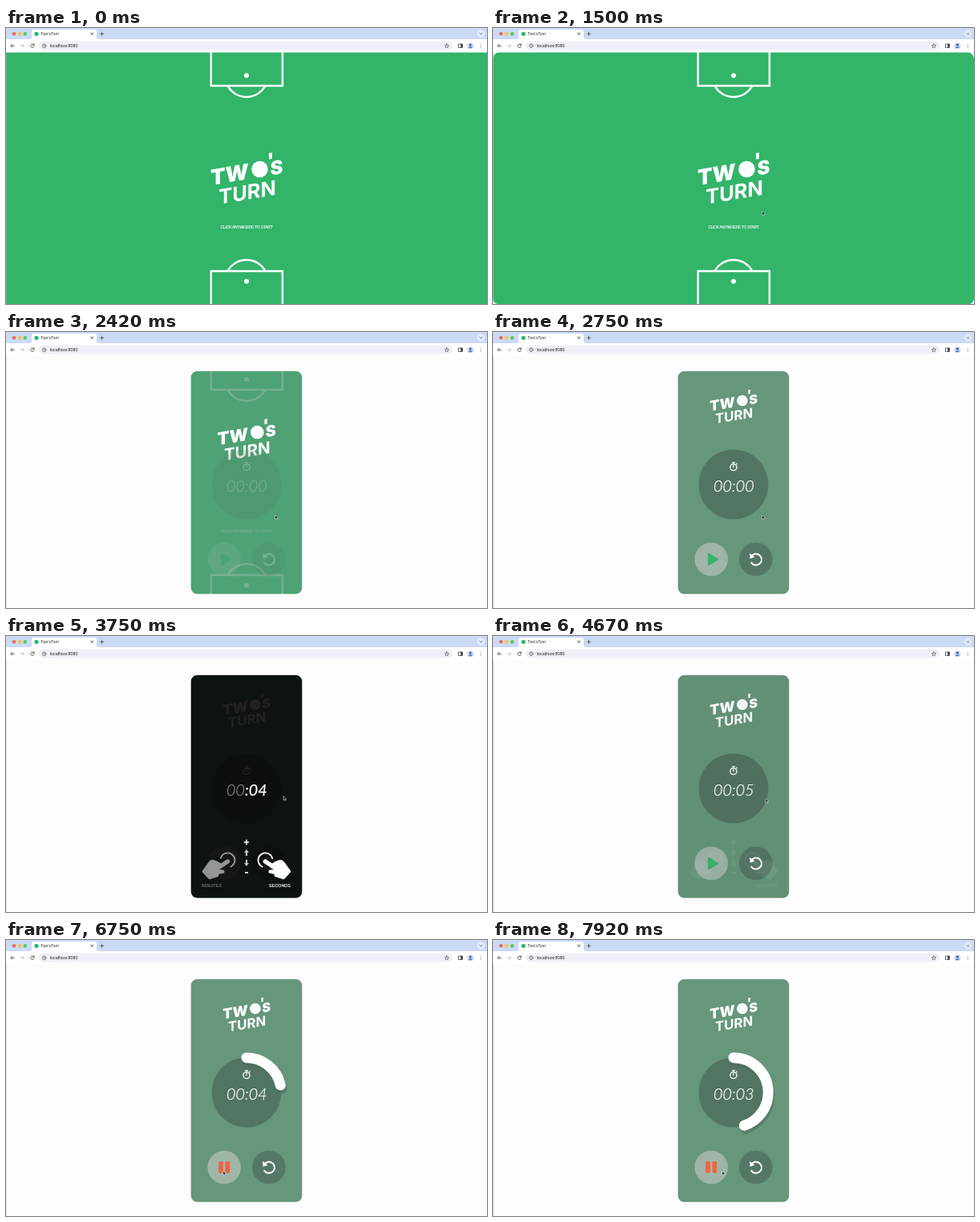
Recreate the animation shown at these times as an HTML page. Size 600x344 px, loop 8 s.

```html
<!DOCTYPE html>
<html lang="en">
<head>
<meta charset="utf-8">
<title>Two'sTurn</title>
<style>
html, body { margin: 0; width: 100%; height: 100%; overflow: hidden; background: #fdfdfd; }
svg { display: block; width: 100vw; height: 100vh; }
text { font-family: "Liberation Sans", Arial, sans-serif; }
.line { fill: none; stroke: #fff; stroke-width: 2.5; }
.ui { fill: none; stroke: #3c4043; stroke-width: .8; stroke-linecap: round; stroke-linejoin: round; }
.logo text { font-family: Inter, "Open Sans", sans-serif; font-weight: 900; fill: #fff; }
#clock { font: italic 300 19.8px Lato, "Open Sans", sans-serif; fill: #fff; stroke: #fff; stroke-width: .25; }
.icon { fill: none; stroke: #fff; stroke-linecap: round; }
.arc { fill: none; stroke-width: 13; stroke-linecap: round; }
</style>
</head>
<body>
<svg viewBox="0 0 600 344" preserveAspectRatio="none">
  <defs>
    <mask id="cardMask" maskUnits="userSpaceOnUse" x="0" y="0" width="600" height="344"><rect id="card" fill="#fff"/></mask>
    <g id="halfPitch">
      <path class="line" d="M255.8 25V72.1H344.9V25M276.9 72.9A27 27 0 0 0 323.1 72.9"/>
      <circle cx="300" cy="59.3" r="3" fill="#fff"/>
    </g>
    <g id="hand">
      <path d="M323.5 281L337 290" stroke="#fff" stroke-width="5.4" stroke-linecap="round"/>
      <path d="M331 284L337 280.5Q344 277 347 281.5L355 292.5Q355.5 294 354 295.5L347.5 302.5Q346 304 343.5 302.5L335.5 300Q334 299 335 297L328 295.5Q326.5 293 329 291.6L335 291Z" fill="#fff"/>
      <path class="icon" stroke-width="1.9" d="M332.2 277A9 9 0 1 0 319.5 287.5"/>
    </g>
    <g id="arrow"><path d="M300 266L303 270H301.1V274H298.9V270H297Z" fill="#c4c6c5"/></g>
  </defs>

  <rect width="600" height="344" fill="#fdfdfd"/>

  <g mask="url(#cardMask)">
    <rect y="30" width="600" height="314" fill="#32b469"/>
    <g id="pitch">
      <use href="#halfPitch"/>
      <use href="#halfPitch" transform="translate(0 375) scale(1 -1)"/>
    </g>
    <g id="hint"><text text-anchor="middle" y="1.9" font-size="5" letter-spacing="-.22" fill="#fff" stroke="#fff" stroke-width=".14">CLICK ANYWHERE TO START</text></g>

    <rect id="tint" y="30" width="600" height="314" fill="#66967c"/>

    <g id="logo" class="logo">
      <circle cx="16.5" cy="-11" r="10.3" fill="#fff"/>
      <g transform="skewY(-9.5)">
        <text x="-45" y="1.6" font-size="27">TW</text>
        <text x="25.5" y="-9" font-size="24">'</text>
        <text x="29.5" y="1.6" font-size="24">S</text>
        <text x="1" y="27" font-size="25.4" text-anchor="middle" style="font-weight:700">TURN</text>
      </g>
    </g>

    <g id="main">
      <circle cx="300" cy="190" r="43.5" fill="#527563"/>
      <g class="icon" stroke-width="1.3">
        <circle cx="300" cy="168.6" r="4.1"/>
        <path d="M300 168.6V166.2M298.6 162.6H301.4M303.6 164.6L304.2 164"/>
      </g>
      <g id="ring">
        <circle class="arc" pathLength="360" cx="300" cy="190" r="43.3" stroke="#48685780" transform="translate(1.5 4) rotate(-90 300 190)"/>
        <circle class="arc" pathLength="360" cx="300" cy="190" r="43.3" stroke="#fff" transform="rotate(-90 300 190)"/>
      </g>
      <circle cx="272.2" cy="283.2" r="20.8" fill="#9fb5a8"/>
      <path id="play" d="M269 276.5L280 283.3L269 290.2Z" fill="#38b26b" stroke="#38b26b" stroke-width="2" stroke-linejoin="round"/>
      <g id="pause" fill="#f1623f">
        <rect x="265.3" y="276" width="5.6" height="14.4" rx="1.6"/>
        <rect x="273.6" y="276" width="5.6" height="14.4" rx="1.6"/>
      </g>
      <circle cx="327.8" cy="283.2" r="20.8" fill="#557866"/>
      <path class="icon" stroke-width="2" d="M322.4 279.4A7 7 0 1 1 322.3 287.6"/>
      <path d="M320.2 275.8L320.6 282.4L326.6 280.6Z" fill="#fff"/>
    </g>

    <g id="shade">
      <rect y="30" width="600" height="314" fill="#000" opacity=".87"/>
      <use href="#hand"/>
      <use href="#hand" transform="translate(600) scale(-1 1)" opacity=".55"/>
      <path d="M296.8 257H303.2M300 253.8V260.2M298 294.8H302" stroke="#fff" stroke-width="1.7"/>
      <use href="#arrow"/>
      <use href="#arrow" transform="translate(0 553) scale(1 -1)"/>
      <text x="244.3" y="313.3" font-size="5.5" fill="#8b8e8c">MINUTES</text>
      <text x="327.8" y="313.3" font-size="5.5" fill="#fff" stroke="#fff" stroke-width=".15">SECONDS</text>
    </g>

    <text id="clock" x="300.4" y="198.6" text-anchor="middle"><tspan id="min">00</tspan><tspan id="sec">:00</tspan></text>
  </g>

  <!-- browser window -->
  <path d="M.3 30V344" stroke="#b9bcc0" stroke-width=".6"/>
  <rect width="600" height="16" fill="#cbdbf7"/>
  <rect y="14" width="600" height="16.3" fill="#fff"/>
  <path d="M29 14.5Q32 14.5 32 11.5V5Q32 2 35 2H110Q113 2 113 5V11.5Q113 14.5 116 14.5Z" fill="#fff"/>
  <circle cx="10" cy="7.3" r="2.3" fill="#ee6a5f"/>
  <circle cx="17" cy="7.3" r="2.3" fill="#f5bd4f"/>
  <circle cx="23.9" cy="7.3" r="2.3" fill="#61c454"/>
  <circle cx="38" cy="7.3" r="2.6" fill="#32b469"/>
  <text x="43.3" y="9" font-size="5" fill="#1f1f1f">Two'sTurn</text>
  <path class="ui" d="M105.8 5.9L108.6 8.7M108.6 5.9L105.8 8.7M117.6 7.3H121.6M119.6 5.3V9.3"/>
  <circle cx="592.4" cy="7.2" r="4.6" fill="#e3ecfc"/>
  <path class="ui" d="M590.9 6.6L592.4 8L593.9 6.6"/>
  <rect x="41" y="16.6" width="516" height="11" rx="5.5" fill="#edf0f7"/>
  <path class="ui" d="M10.3 22.2H6.2M8 20.2L6 22.2L8 24.2"/>
  <path class="ui" style="stroke:#b4b7bb" d="M18 22.2H22.2M20.4 20.2L22.4 22.2L20.4 24.2"/>
  <path class="ui" d="M34.6 20.8A2.2 2.2 0 1 0 35 22.9M35.1 19.6V21.3H33.4"/>
  <circle cx="47.6" cy="22.2" r="2.3" class="ui" style="stroke-width:.6"/>
  <path class="ui" style="stroke-width:.6" d="M47.6 22V23.4M47.6 20.9V21"/>
  <text x="54.8" y="24" font-size="5.4" fill="#1f1f1f">localhost:8080</text>
  <path class="ui" style="stroke-width:.6" d="M549.8 19.7L550.6 21.4L552.4 21.6L551 22.8L551.4 24.6L549.8 23.7L548.2 24.6L548.6 22.8L547.2 21.6L549 21.4Z"/>
  <rect x="564.8" y="20" width="4.6" height="4.4" class="ui"/>
  <rect x="567.2" y="20" width="2.2" height="4.4" fill="#3c4043"/>
  <circle cx="579.3" cy="22.2" r="4" fill="#c6d7f8"/>
  <circle cx="579.3" cy="21" r="1.3" fill="#28488c"/>
  <path d="M576.8 24.6Q579.3 21.6 581.8 24.6Z" fill="#28488c"/>
  <path class="ui" d="M592.2 20.2V20.21M592.2 22.2V22.21M592.2 24.2V24.21"/>

  <path id="cursor" d="M0 0V5L1.2 4L2 5.9L2.9 5.5L2.1 3.7H3.7Z" fill="#111" stroke="#fff" stroke-width=".5"/>
</svg>
<script>
const LOOP = 8000;
const $ = id => document.getElementById(id);
const arcs = document.querySelectorAll(".arc");

// [time, value...] rows, interpolated in between
const SPREAD = [[1540, 1], [1600, .45], [1670, .104], [1750, .03], [1830, .008], [1920, 0]];
const CURSOR = [[350, 604, 300], [850, 335.8, 228.3], [3080, 335.5, 228.3], [3750, 346, 199.5],
  [4250, 347, 194], [4550, 347, 194], [5200, 271, 288], [7720, 271, 288], [7900, 286, 288]];
const SECONDS = [[0, 0], [3260, 1], [3400, 2], [3540, 3], [3680, 4], [4150, 5]];
const CLICK = 5500, RUN = 5670, TOTAL = 5000;

const clamp = v => Math.min(1, Math.max(0, v));
const ramp = (t, a, b) => clamp((t - a) / (b - a));
const smooth = p => p * p * (3 - 2 * p);
const mix = (a, b, p) => a + (b - a) * p;

function track(rows, t, ease = p => p) {
  let i = 0;
  while (i < rows.length - 2 && t > rows[i + 1][0]) i++;
  const [a, b] = [rows[i], rows[i + 1]];
  const p = ease(ramp(t, a[0], b[0]));
  return a.slice(1).map((v, k) => mix(v, b[k + 1], p));
}

function set(id, attrs) {
  for (const k in attrs) $(id).setAttribute(k, attrs[k]);
}

function secondsAt(t) {
  if (t >= RUN) return Math.ceil((TOTAL - (t - RUN)) / 1000);
  return SECONDS.filter(row => row[0] <= t).pop()[1];
}

function draw(t) {
  const [open] = track(SPREAD, t);
  const half = mix(69.3, 300, open);
  const top = mix(48.7, 30.3, open);
  const bottom = mix(326.6, 344.5, open);
  set("card", { x: 300 - half, y: top, width: half * 2, height: bottom - top, rx: 8 * ramp(t, 1400, 1500) });

  const pulse = .985 + .015 * Math.cos(t / 1000 * 2 * Math.PI);
  const enter = smooth(ramp(t, 2150, 2650));
  set("hint", { transform: `translate(300 248) scale(${pulse})`, opacity: 1 - enter });
  set("pitch", { opacity: 1 - enter });
  set("tint", { opacity: enter });
  set("logo", { transform: `translate(300 ${mix(187, 92.7, enter)}) scale(${mix(1, .66, enter)})` });

  const ui = ramp(t, 2350, 2700);
  set("main", { opacity: ui });
  set("clock", { opacity: ui });

  const shade = ramp(t, 2880, 3080) * (1 - ramp(t, 4450, 4680));
  set("shade", { opacity: shade });
  const dim = 1 - .55 * shade;
  set("min", { "fill-opacity": dim, "stroke-opacity": dim });
  $("sec").style.fontWeight = shade > .5 ? 400 : 300;
  $("sec").textContent = ":0" + secondsAt(t);

  const running = ramp(t, CLICK, CLICK + 80);
  set("play", { opacity: 1 - running });
  set("pause", { opacity: running });

  const angle = Math.max(0, t - RUN) / TOTAL * 360;
  set("ring", { visibility: angle > 0 ? "visible" : "hidden" });
  arcs.forEach(a => a.setAttribute("stroke-dasharray", `${angle} 400`));

  const [x, y] = track(CURSOR, t, smooth);
  set("cursor", { transform: `translate(${x} ${y})` });
}

const start = performance.now();
function tick() {
  draw((performance.now() - start) % LOOP);
  requestAnimationFrame(tick);
}
tick();
</script>
</body>
</html>
```
